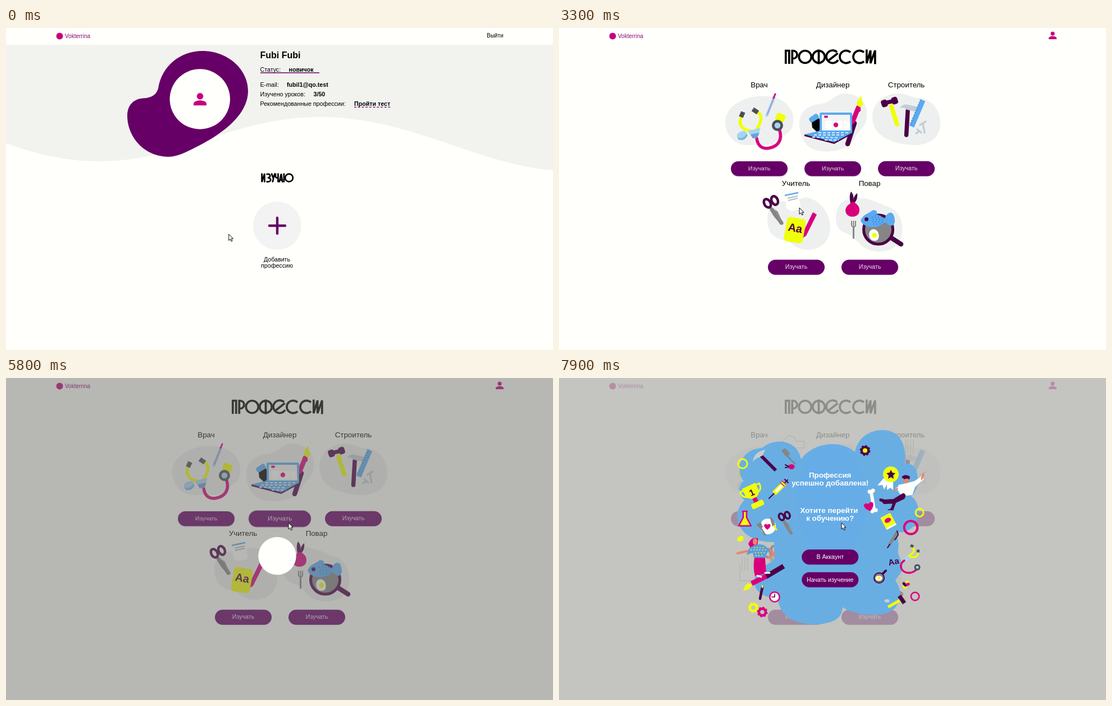
These frames come from a looping animation (974 px wide and 575 px high, 8 s). An HTML page:

```html
<!DOCTYPE html>
<html lang="ru">
<head>
<meta charset="utf-8">
<title>Профессии</title>
<style>
html, body { margin: 0; width: 100%; height: 100%; overflow: hidden; background: #fffffc; }
svg { display: block; width: 974px; height: 575px; font: 10.67px "Liberation Sans", Arial, sans-serif; }
.b { font-weight: bold; }
.m { text-anchor: middle; }
.h { font-size: 13.33px; }
.line { fill: none; stroke-linecap: round; stroke-linejoin: round; }
.letter { fill: none; stroke: #000; }
.y { fill: #f0ff0a; } .p { fill: #4b0046; } .r { fill: #d9007c; } .u { fill: #5aaaf2; }
.l { fill: #a8d4f0; } .g { fill: #858585; } .w { fill: #fffffc; } .d { fill: #4a4f58; } .s { fill: #c3ced4; }
.sy { stroke: #f0ff0a; } .sp { stroke: #4b0046; } .sr { stroke: #d9007c; } .su { stroke: #5aaaf2; }
.sl { stroke: #a8d4f0; } .sg { stroke: #858585; } .sw { stroke: #fffffc; } .sd { stroke: #4a4f58; } .ss { stroke: #c3ced4; }
.skin { fill: #e8856a; } .sskin { stroke: #e8856a; }

.profile, .jobs, .modal, .loader, .core, .ring, .hand, .arrow, .cursor, .add, .one, .two { animation: 8s linear infinite; }
.add, .one, .two, .core, .ring { transform-box: fill-box; transform-origin: center; }
.profile { animation-name: profile; }
.jobs { animation-name: jobs; }
.modal { animation-name: modal; }
.loader { animation-name: loader; }
.core { animation-name: core; }
.ring { animation-name: ring; }
.hand { animation-name: hand; animation-timing-function: step-end; }
.arrow { animation-name: arrow; animation-timing-function: step-end; }
.cursor { animation-name: cursor; animation-timing-function: ease-in-out; }
.add { animation-name: add; }
.one { animation-name: one; }
.two { animation-name: two; }

@keyframes profile { 0%, 18.7% { opacity: 1 } 18.71%, 100% { opacity: 0 } }
@keyframes jobs { 0%, 18.7% { opacity: 0 } 18.71%, 100% { opacity: 1 } }
@keyframes modal { 0%, 80.8% { opacity: 0 } 82.5%, 100% { opacity: 1 } }
@keyframes loader {
  0%, 18.7% { opacity: 0 } 18.71%, 37.5% { opacity: 1 } 41.2%, 72.4% { opacity: 0 }
  72.41%, 91.25% { opacity: 1 } 95%, 100% { opacity: 0 }
}
@keyframes core {
  0%, 31.25% { transform: scale(1); opacity: 1 } 33.75% { transform: scale(.73); opacity: .25 }
  37.5%, 41.2% { transform: scale(.2); opacity: 0 }
  41.3%, 85% { transform: scale(1); opacity: 1 } 87.5% { transform: scale(.73); opacity: .25 }
  91.25%, 95% { transform: scale(.2); opacity: 0 } 100% { transform: scale(.2); opacity: 0 }
}
@keyframes ring {
  0%, 27.5% { transform: scale(1); opacity: 1 } 31.25% { transform: scale(1.105); opacity: .7 }
  33.75% { transform: scale(1.165); opacity: .62 } 37.5%, 41.2% { transform: scale(1.75); opacity: .1 }
  41.3%, 81.25% { transform: scale(1); opacity: 1 } 85% { transform: scale(1.105); opacity: .7 }
  87.5% { transform: scale(1.165); opacity: .62 } 91.25%, 100% { transform: scale(1.75); opacity: .1 }
}
@keyframes cursor {
  0%, 7% { transform: translate(396.5px, 368px) }
  15%, 37.5% { transform: translate(473.5px, 344.5px) }
  41.2%, 44.5% { transform: translate(428px, 321px) }
  53%, 56% { transform: translate(381px, 255px) }
  65%, 100% { transform: translate(503px, 258.5px) }
}
@keyframes hand { 0% { opacity: 0 } 52% { opacity: 1 } 59.2% { opacity: 0 } 60.4% { opacity: 1 } 72.4%, 100% { opacity: 0 } }
@keyframes arrow { 0% { opacity: 1 } 52% { opacity: 0 } 59.2% { opacity: 1 } 60.4% { opacity: 0 } 72.4%, 100% { opacity: 1 } }
@keyframes add { 0%, 12.5% { transform: scale(1) } 17%, 100% { transform: scale(1.095) } }
@keyframes one { 0%, 52% { transform: scale(1) } 55%, 55.5% { transform: scale(1.065) } 57.5%, 59% { transform: scale(1.1) } 63%, 100% { transform: scale(1) } }
@keyframes two { 0%, 60.5% { transform: scale(1) } 66% { transform: scale(1.06) } 69%, 72.6% { transform: scale(1.1) } 73.7%, 100% { transform: scale(1) } }
</style>
</head>
<body>
<svg viewBox="0 0 974 575">
<defs>
  <g id="person" fill="#c6007e"><circle cy="-5.5" r="5.8"/><path d="M-11.5 11v-3c0-4 7-6 11.5-6s11.5 2 11.5 6v3z"/></g>
  <g id="pill"><rect x="-50.5" y="-13.5" width="101" height="27" rx="13.5" fill="#660066"/></g>
  <g id="study"><use href="#pill"/><text class="m" y="3" fill="#f0dcf0">Изучать</text></g>
  <g id="brand"><circle cx="95.5" cy="14.5" r="6" fill="#c6007e"/><text x="105" y="18" font-size="10" fill="#8a0a70">Vokterrina</text></g>
  <path id="heart" d="M0 6C-9 0-6-7 0-3 6-7 9 0 0 6z"/>
  <g id="gear"><circle r="6" fill="none" stroke="currentColor" stroke-width="4.5"/><circle r="8.2" fill="none" stroke="currentColor" stroke-width="2.6" stroke-dasharray="3.5 2.94"/></g>
  <g id="scissors">
    <path class="line sg" stroke-width="7" d="M9 20L26 44"/><path class="g" d="M5 18l14 5 11 24q-17-8-25-29z"/>
    <path d="M15 19l9 20" stroke="#aaa" stroke-width=".7"/>
    <g class="line sp" stroke-width="4.5"><ellipse cx="1" cy="9" rx="5.5" ry="8" transform="rotate(-30 1 9)"/><ellipse cx="14" cy="4" rx="5.5" ry="8" transform="rotate(-25 14 4)"/></g>
  </g>
  <g id="scope" class="line">
    <g class="sy" stroke-width="5.5"><path d="M324 160c-6 14 5 22 17 24"/><path d="M352 150c12 4 8 20-1 32"/></g>
    <path class="sd" stroke-width="8" stroke-linecap="butt" d="M328 150l-4 9M345 145l9 6"/>
    <path class="sr" stroke-width="5.5" d="M352 197c2 16 13 20 24 17 17-4 21-17 17-31"/>
    <path class="l" d="M336 184l23-6-6 18-8 1z"/><path d="M341 190l16-3-4 9-8 1z" fill="#6f9dd8"/>
    <circle class="d" cx="389" cy="174" r="10"/><circle class="l" cx="389" cy="174" r="5.3"/>
  </g>
</defs>
<rect width="974" height="575" fill="#fffffc"/>

<g class="profile">
  <path fill="#f2f2ef" d="M0 30H974V254C836 243 720 159 560 159 400 159 315 238 165 238 100 238 45 222 0 206z"/>
  <use href="#brand"/>
  <text x="856" y="16.5" font-size="10">Выйти</text>
  <path fill="#660066" d="M271 108C277 68 310 41 350 41 395 41 431 74 431 112 431 158 380 193 330 217 316 224 302 230 289 230 246 230 216 194 216 157 216 138 227 127 243 125.500 259 125 268 119 271 108z"/>
  <circle class="w" cx="345.300" cy="127" r="53.700"/>
  <use href="#person" x="345.500" y="127.300"/>
  <text x="452.500" y="53.500" class="b" font-size="16">Fubi Fubi</text>
  <text x="452.500" y="77.500">Статус:</text><text x="503.500" y="77.500" class="b">новичок</text>
  <path d="M453 80H558" stroke="#660066" stroke-width="1.400"/>
  <text x="452.500" y="105">E-mail:</text><text x="500" y="105" class="b">fubil1@qo.test</text>
  <text x="452.500" y="121.700">Изучено уроков:</text><text x="547.500" y="121.700" class="b">3/50</text>
  <text x="452.500" y="138.500">Рекомендованные профессии:</text><text x="620" y="138.500" class="b">Пройти тест</text>
  <path d="M620 141.300H685" stroke="#660066" stroke-width="1.300" stroke-dasharray="4 2.700"/>
  <g class="letter" stroke-width="2.700" aria-label="Изучаю">
    <path d="M455.600 259.500V275L460.400 260V275.500M463.500 261.300c8-2 9 5.500 2.500 6 8 .5 6.500 9-2.500 7M472.700 259.500l3.300 9M478.600 259.500L474.500 275.500M480 259.500v6q1 3 4 1.500M484.500 259.500V275.500M486.700 275.500L490 260.500 492.300 275.500M487.500 271.500h4M494.900 259.500V275.500M495 267.500h3"/>
    <circle cx="504" cy="267.500" r="6.900"/>
  </g>
  <g class="add"><circle cx="482.800" cy="353" r="43" fill="#f2f3f2"/><path class="line" stroke="#660066" stroke-width="4.400" d="M469 353H497M483 339V367"/></g>
  <text class="m" x="482.500" y="416.500">Добавить</text><text class="m" x="482.500" y="428">профессию</text>
</g>

<g class="jobs">
  <rect width="974" height="575" fill="#fffffc"/>
  <use href="#brand"/>
  <use href="#person" transform="translate(879 13.300) scale(.61)"/>
  <g class="letter" stroke-width="3.700" aria-label="Профессии">
    <path d="M403.800 64V40.500H409.800V64M415.300 64V40.500H417a6 6 0 0 1 0 14H415M462.500 38.500V64.500M495 43A11.300 11.300 0 1 0 497 57M480 58L496.500 45M519 43.500A11.200 11.200 0 1 0 519 59.500M543 43.500A11.200 11.200 0 1 0 543 59.500M547.800 38.500V63L554.700 40V63L562.800 40V64.500"/>
    <circle cx="438.300" cy="51.500" r="11"/><circle cx="462.500" cy="51.500" r="10.800"/>
  </g>
  <g class="m h">
    <text x="356.500" y="106">Врач</text><text x="487.500" y="106">Дизайнер</text><text x="618.500" y="106">Строитель</text>
    <text x="422" y="282">Учитель</text><text x="553" y="282">Повар</text>
  </g>
  <g fill="#eef0f0">
    <path d="M296 164C300 134 340 118 372 122 402 124 420 145 417 169 415 188 403 186 395 200 385 213 359 207 339 209 312 212 294 188 296 164z"/>
    <path d="M428 171C428 147 446 137 468 135 486 133 488 118 510 117 532 117 550 133 548 157 546 180 535 180 525 199 512 221 482 222 461 219 440 215 428 196 428 171z"/>
    <path d="M558 158C558 137 577 117 602 117 622 117 627 126 642 125 664 127 681 148 679 174 677 198 657 210 630 209 590 206 558 193 558 158z"/>
    <path d="M371 341C371 318 389 304 408 311 423 317 428 298 447 304 472 313 484 338 483 359 481 383 464 397 440 396 419 395 417 382 401 379 382 375 371 365 371 341z"/>
    <path d="M493 338C493 315 510 302 530 303 558 304 570 314 588 320 607 328 613 347 611 367 607 390 590 400 568 399 546 398 538 389 525 374 510 363 493 367 493 338z"/>
  </g>

  <g class="line">
    <path class="sl" stroke-width="5" d="M370 156L383 124"/><path stroke="#9c5fc0" stroke-width="1" d="M371 154L383 124"/><path class="sr" stroke-width="3" d="M382 125l3-7"/>
    <rect class="y" x="386" y="153" width="17" height="15" rx="5" transform="rotate(25 395 160)"/>
    <use href="#scope"/>
    <g transform="rotate(-25 326 192)"><path fill="#78b8e6" d="M317 190h18v6q-9 8-18 0z"/><ellipse class="l" cx="326" cy="190" rx="9" ry="5.500"/></g>
  </g>

  <g>
    <rect class="u" x="445" y="156" width="18" height="10" rx="4" transform="rotate(-35 454 161)"/>
    <path d="M450 169l13-8 5 14-7 12-10-9z"/>
    <path class="line sp" stroke-width="8.500" d="M514 207L526 170"/><path class="line sr" stroke-width="8.500" stroke-linecap="butt" d="M523 167L533 142"/><circle class="r" cx="533" cy="146" r="4.300"/>
    <path class="y" d="M530 138l1-7 7-10q2 10 4 15l-5 6z"/>
    <path class="u" d="M467 151h52q3 0 3 3v33h-58v-33q0-3 3-3z"/><path fill="#f4f5f4" d="M468 155h50l1 28h-51z"/>
    <rect class="r" x="472" y="156.500" width="7" height="4" rx="2"/><path class="w" d="M474 166h12v14h-12zM489 166h16v14h-16zM507 166h10v14h-10z"/>
    <circle class="r" cx="493" cy="173" r="4.200"/>
    <path class="p" d="M437 190v3l53 14 31-17v-4z"/><path class="u" d="M437 190l29-7 56 1v3l-32 17z"/>
    <path stroke="#d8ecfa" stroke-width="2" stroke-dasharray="5 3" d="M462 187h54M454 191h54M451 195l48 1M473 200h25"/>
  </g>

  <g class="line">
    <path class="sy" stroke-width="8" d="M592 140L602 172"/><path class="sp" stroke-width="7" d="M580 134l17-4"/>
    <rect class="p" x="574" y="128" width="11" height="13" rx="4" transform="rotate(-18 580 135)"/><rect class="p" x="592" y="123" width="11" height="13" rx="4" transform="rotate(-18 598 129)"/>
    <path class="sp" stroke-width="7.500" d="M621 148L618.500 191"/><path class="s" d="M607 143q5-8 14-6l19 4-1 10-6-2-9-2-4-1q-5-5-13-3z"/>
    <path class="su" stroke-width="9" stroke-linecap="butt" d="M648 129L628 176"/><path stroke="#3778b8" stroke-width="3" stroke-linecap="butt" stroke-dasharray="1 4" d="M644 128L625 174"/>
    <path class="ss" stroke-width="3.500" d="M643 173l10-6M648 171l3 16M638 181l7 6M642 184l-6 4"/>
  </g>

  <g>
    <path class="w" d="M402 299l23-5 6 29-17 4-9-5z"/><path class="su" stroke-width="2.600" d="M402 299l24-5"/><path stroke="#b8bbbb" stroke-width="1.800" d="M407 304l18-4M408 308l17-4"/>
    <use href="#scissors" x="370" y="304"/>
    <path class="r" d="M452 329l7 4-19 38-6 4 0-9z"/>
    <g transform="rotate(10 420 361)"><rect class="y" x="403" y="339" width="34" height="44" rx="6"/><text class="m p" x="420" y="364" font-size="20" font-weight="bold">Aa</text></g>
  </g>

  <g>
    <path class="p" d="M519 313q-3-14 1-21 6 6 4 16 1-9 7-13 2 11-7 20z"/><path class="r" d="M523 310c6 3 12 7 12 15 0 9-7 12-13 12s-12-4-12-12c1-8 8-11 13-15z"/>
    <path class="line sg" stroke-width="2" d="M521 345v8q4 5 7 0v-8M524.500 345V360"/><path class="line sg" stroke-width="3" d="M524.500 357V375"/>
    <path class="line sp" stroke-width="8.500" d="M592 375L609 386"/><circle class="g sp" cx="568.500" cy="360" r="26" stroke-width="5"/>
    <path class="u" d="M537 344c4-11 14-13 18-16 4-4 9-3 11 0v5c7 2 11 5 14 8 2-8 7-12 12-11 5 2 6 11 6 15s-3 9-8 8c-5-2-7-5-10-6-9 12-37 12-43-3z"/>
    <circle class="p" cx="547.500" cy="341.500" r="3.500"/><path fill="none" stroke="#2e70b0" stroke-width="1.500" stroke-dasharray="1.500 4" d="M557 338h20M559 342h20M558 346h20M560 350h18M563 334h9"/>
    <path class="w" d="M553 364c4-7 11-5 14-1 4 5 4 17-4 17-8 1-13-8-10-16z"/><circle class="y" cx="561.700" cy="370" r="4.400"/>
  </g>

  <g class="one"><use href="#study" x="356.500" y="251.300"/></g>
  <g class="two"><use href="#study" x="487.500" y="251.300"/></g>
  <use href="#study" x="618.500" y="251.300"/><use href="#study" x="422.500" y="427.300"/><use href="#study" x="553.500" y="427.300"/>
</g>

<g class="modal">
  <rect width="974" height="575" fill="#b4b4b0" opacity=".78"/>
  <g fill="none" stroke="#a5a5a1" stroke-width=".7"><path d="M398 118q-3-9 6-9 3-9 12-4 6-1 5 8h16v12h-23M617 110v35M621 110v25M626 110v35M631 110v25M326 320v24M331 320v24M336 320v24M321 362h64M322 330v32"/></g>
  <path fill="#68aee3" d="M322 160C324 140 338 126 362 125 378 110 409 109 423 127Q428 133 431 145C446 125 468 118 487 118 506 118 518 125 527 132 532 106 553 93 577 93 603 93 620 114 616 153 632 151 639 165 639 182 640 196 632 207 627 211 637 218 641 230 640 242 637 268 620 276 603 276 601 288 606 291 604 305 602 318 610 320 611 338 611 350 603 353 599 362 607 373 609 383 605 397 600 418 580 423 558 423 537 422 516 418 505 409 504 431 487 437 461 440 424 441 392 427 390 394 370 392 348 385 348 364 348 348 361 337 383 326V293C353 294 320 281 317 248 317 237 322 227 330 218 318 208 320 190 329 184 323 177 321 168 322 160z"/>
  <ellipse cx="485" cy="220" rx="62" ry="100" fill="#66adea" opacity=".65"/>

  <g class="line" stroke-width="3">
    <circle class="sy" cx="327" cy="153" r="8.200"/><circle class="sy" cx="642" cy="240.500" r="7"/><circle class="sr" cx="626.500" cy="267" r="11.800" stroke-width="4"/><circle class="sr" cx="634" cy="390" r="7.200" stroke-width="2.500"/>
    <path class="sp" stroke-width="6" stroke-linecap="butt" d="M359 138L386 165"/><path class="s" d="M345 150q2-18 22-22l-4 10-7 4q-6 1-11 8z"/>
    <path class="sg" d="M404 137L420 153" stroke-width="2.600"/><path class="g" d="M396 130l6-5 9 9-2 5-5 1z"/>
    <ellipse class="r" cx="414" cy="158.500" rx="5.500" ry="4.500"/><path class="sp" stroke-width="2" d="M409 158l-6-3M409 159l-6 1"/>
    <g transform="rotate(-25 344 206)"><path class="sy" d="M332 195h-7q0 13 10 13M356 195h7q0 13-10 13"/><path class="y" d="M331 191h26v17q-13 16-26 0z"/><path class="r" d="M340 215h8v9h-8z"/><rect class="y" x="333" y="223" width="23" height="10" rx="3"/><text class="b m p" x="344" y="210" font-size="16">1</text></g>
    <path class="sp" stroke-width="2" d="M374 215L386 203M399 190l8-8M402 181l6 6"/><path class="sy" stroke-width="9" stroke-linecap="butt" d="M383 206L402 187"/><path class="sw" stroke-width="4" stroke-linecap="butt" d="M386 203l12-12"/><path class="sr" stroke-width="1.500" d="M394 187l7 6M397 184l7 6"/>
    <path class="y sr" stroke-width="2.500" d="M327 238h8M328 238v11l-8 15h22l-8-15v-11"/>
    <circle class="w" cx="372" cy="265" r="14"/><use class="r" href="#heart" x="371" y="265"/><path class="sg" d="M359 267l8 13"/><path class="g" d="M351 262l8-5 4 9-4 4z"/><path class="g" d="M375 248q8 2 10 16l-5 1z"/><path class="sy" d="M383 264l4 7"/>
    <use href="#scissors" transform="translate(396 241) scale(.78) rotate(5)"/>
    <ellipse class="y" cx="323" cy="287" rx="6" ry="4.500" transform="rotate(-30 323 287)"/>
  </g>

  <g class="line">
    <path class="r" d="M337 296q5-13 17-10 1 8-2 15l-11 3z"/><ellipse class="skin" cx="349" cy="292" rx="4" ry="6"/>
    <path class="sskin" stroke-width="4" d="M336 309l-18 4M374 305l9 11-10 5"/>
    <path fill="#5a9ee0" d="M338 305q14-12 28-6l10 8-6 6-3 8h-20l-2-9-11 4z"/><path class="sy" stroke-width="2" stroke-dasharray=".1 5" d="M342 307h28M348 303h20M350 312h18M351 317h15"/>
    <path class="r" d="M348 321h19l2 28-20 5q-4-15-1-33z"/>
    <path class="sp" stroke-width="9" stroke-linecap="butt" d="M368 355L400 336"/><path class="sr" stroke-width="9" stroke-linecap="butt" d="M343 367L369 354"/>
    <path class="sw" stroke-width="3" d="M353 353l7 2M367 348l8 0"/><path class="y" d="M328 380q2-10 9-14l7 4-5 7z"/>
    <path class="sp" stroke-width="4.500" d="M362 374L358 394"/><path class="sy" stroke-width="2.500" d="M362 371v3"/>
    <circle class="w sr" cx="384" cy="391" r="8.700" stroke-width="2.500"/><path class="sp" stroke-width="1.600" d="M384 386v5h-5"/>
  </g>
  <use href="#gear" x="346" y="410" color="#f0ff0a"/><use href="#gear" x="362" y="418" color="#d9007c"/>
  <use href="#gear" x="545" y="129.500" color="#4b0046"/><circle class="y" cx="545" cy="129.500" r="4"/>

  <g class="line">
    <path class="w" d="M578 179l-11 13 9-1 3 8 8-14zM584 184v16l6-4 5 4v-16z"/><circle class="y" cx="591" cy="172" r="14"/>
    <path class="p" d="M591 164l2.500 5 5.500 1-4 4 1 6-5-3-5 3 1-6-4-4 5.500-1z"/>
    <path class="sw" stroke-width="6" d="M556 204L561 236"/><path class="sw" stroke-width="7" d="M553 203h.1M559 201h.1M558 238h.1M564 236h.1"/><use class="r" href="#heart" transform="translate(552 229) rotate(-15) scale(1.500)"/>
    <path class="w" d="M604 191l14-3 15-4 12-8 2 5-13 14-5 14-19 2-6-9z"/><path class="sw" stroke-width="5" d="M615 192l-13 6M634 190l13-10"/>
    <path class="sskin" stroke-width="3.500" d="M646 180l3-8M602 198l-4 2"/><ellipse class="skin" cx="618" cy="182" rx="5" ry="6"/><path class="p" d="M610 177q6-7 15-1l-1 5q-6-3-9 0z"/>
    <path class="sp" stroke-width="8" d="M613 210l-16 10-17 1M612 213l-17 8"/><path class="sp" stroke-width="5" d="M582 221l-9-3M600 216l-7 18"/><path class="p" d="M570 215l8 1-1 7zM584 236l11-5 1 5z"/>
    <g transform="rotate(-28 586 255)"><rect class="y" x="576" y="244" width="20" height="24" rx="1"/><path class="w" d="M577 265h19v3h-19z"/><ellipse class="r" cx="586" cy="254" rx="6" ry="4"/></g>
    <path class="sg" stroke-width="5" d="M589 297L601 277"/><path class="sp" stroke-width="2" d="M585 303l4-6M602 273l2 7-6 9"/>
    <text class="b m p" font-size="15" transform="translate(597 333) rotate(-12)">Aa</text>
    <use href="#scope" transform="translate(523 158) rotate(31 350 180) scale(.65) translate(-73 90)" visibility="hidden"/>
    <path class="sy" stroke-width="3.500" d="M629 303q9 6-8 16M639 312q1 10-17 8"/><path class="sd" stroke-width="5" stroke-linecap="butt" d="M626 299l5 2M637 309h5"/>
    <path class="sr" stroke-width="3.500" d="M616 325c-13 8-7 23 7 23 7 0 13-4 15-9"/><path class="l" d="M613 321l7-4 7 5-9 6z"/><circle class="l sd" cx="638" cy="338" r="4" stroke-width="3"/>
    <path class="sp" stroke-width="4" d="M575 351l7-7"/><circle class="g sp" cx="570" cy="357" r="9" stroke-width="2"/><ellipse class="w" cx="569.500" cy="357.500" rx="6" ry="4.500"/><circle class="y" cx="570" cy="357" r="2.600"/>
    <path class="sy" stroke-width="5" d="M615 373l2 1M619 365l2-1"/><path class="sp" stroke-width="5" d="M614 367l3 3"/><path class="sr" stroke-width="5" d="M620 369l2-1"/>
    <path class="sy" stroke-width="5" stroke-linecap="butt" d="M586 409L607 397"/><path class="p" d="M603 391l6-4 9 13-6 4z"/><ellipse class="s" cx="584" cy="398" rx="4.500" ry="3"/>
  </g>

  <g class="m b h" fill="#fffffc">
    <text x="482.700" y="177.500">Профессия</text><text x="482.700" y="192">успешно добавлена!</text>
    <text x="481" y="240.500">Хотите перейти</text><text x="482.700" y="255">к обучению?</text>
  </g>
  <use href="#pill" x="482.800" y="319.700"/><use href="#pill" x="482.800" y="360.200"/>
  <g class="m" fill="#fffffc"><text x="482.700" y="323.300">В Аккаунт</text><text x="482.700" y="363.500">Начать изучение</text></g>
</g>

<g class="loader">
  <rect width="974" height="575" fill="#70706d" opacity=".5"/>
  <circle class="ring w" cx="483" cy="317.700" r="33.500"/>
  <circle class="core w" cx="483" cy="317.700" r="33.500"/>
</g>

<g class="cursor" stroke="#000" stroke-linejoin="round" fill="#fff">
  <path class="arrow" d="M0 0V11.500L2.700 9 4.600 13 6.500 12.200 4.700 8.200H8z"/>
  <path class="hand" d="M-.8 6V1q1.200-1.800 2.400 0v3.500q4-.3 6 1.200v3.800L6.500 12H.5L-3 7.700q0-2 2.200-.2z"/>
</g>
</svg>
</body>
</html>
```
